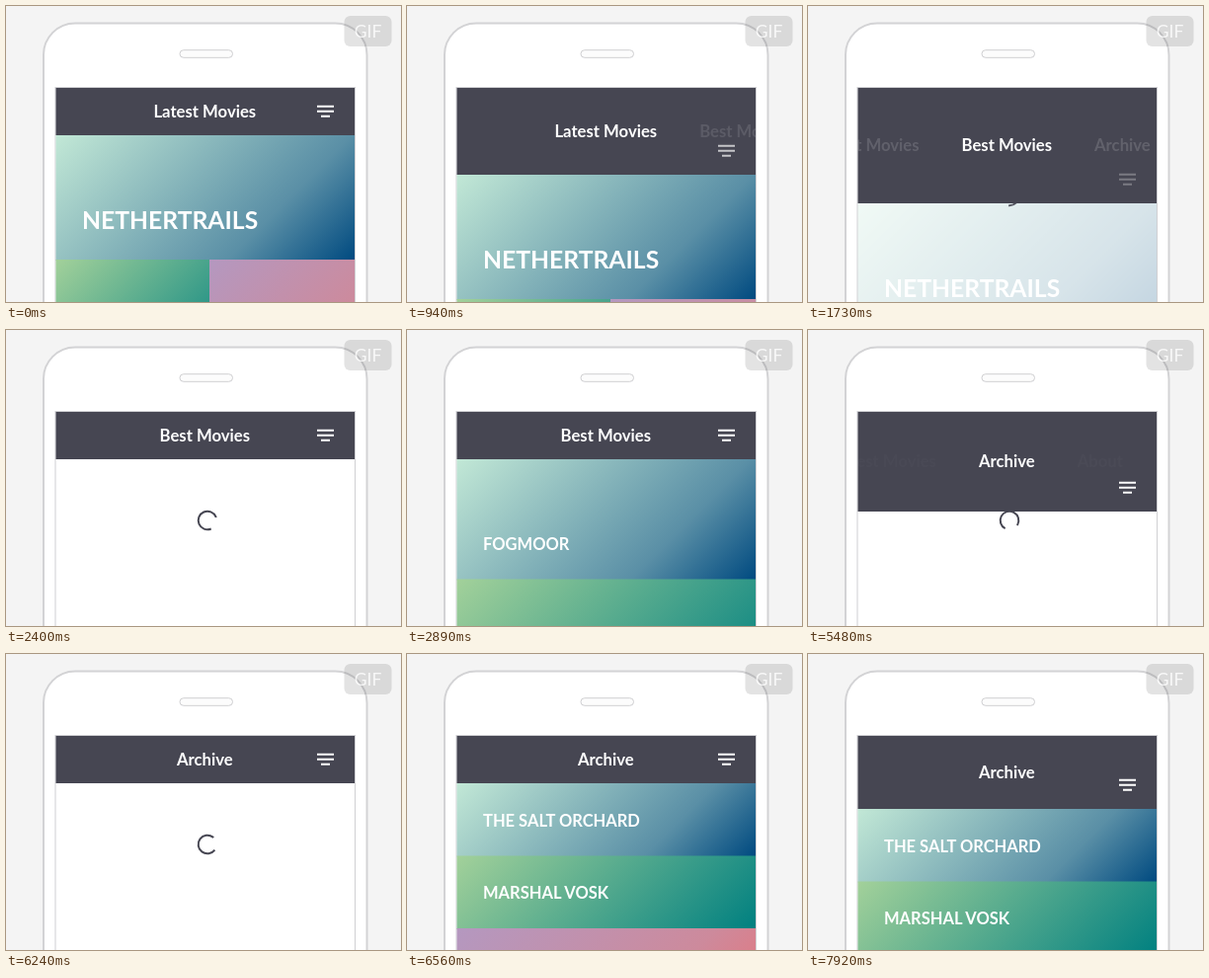
An HTML page for the animation above (8000 ms loop, 400 by 300 pixels).

```html
<!DOCTYPE html>
<html lang="en">
<head>
<meta charset="utf-8">
<title>Pull-down menu</title>
<style>
html, body { margin: 0; width: 100%; height: 100%; overflow: hidden; background: #f4f4f4; }
svg { display: block; width: 100%; height: 100%; }
text { font-family: Lato, "Open Sans", sans-serif; font-weight: 700; fill: #fff; }
</style>
</head>
<body>
<svg id="stage" viewBox="0 0 400 300">
  <defs>
    <clipPath id="screen"><rect x="50.5" y="83" width="302.5" height="217"/></clipPath>
  </defs>
  <rect width="400" height="300" fill="#f4f4f4"/>
  <rect x="38" y="17.5" width="327.5" height="340" rx="32" fill="#fff" stroke="#d3d3d5" stroke-width="2"/>
  <rect x="176" y="44.7" width="53.5" height="7.6" rx="3.8" fill="#fcfcfc" stroke="#cfcfd1"/>
  <rect x="50" y="82.5" width="303.5" height="240" fill="#fff" stroke="#d0d0d3"/>
  <g clip-path="url(#screen)">
    <g id="pages"></g>
    <circle id="spinner" cx="204" cy="193" r="9.3" fill="none" stroke="#464652" stroke-width="2" pathLength="360" stroke-dasharray="275 85"/>
    <rect id="bar" x="50" y="83" width="304" fill="#464652"/>
    <g id="titles" text-anchor="middle" font-size="16.7"></g>
    <path id="icon" d="M315 -5h17M315 0h17M319 5h9" stroke="#fff" stroke-width="2.1"/>
  </g>
  <rect x="342.5" y="10" width="48" height="31" rx="6" fill="#000" fill-opacity=".11"/>
  <text x="366.5" y="32" text-anchor="middle" font-size="17.5" fill-opacity=".8" style="font-weight:400">GIF</text>
</svg>
<script>
const LOOP = 8000, TOP = 83, REST = 131, LEFT = 50, WIDE = 303.5, CENTER = 201.3, GAP = 43;
const $ = id => document.getElementById(id);
const clamp = x => Math.min(1, Math.max(0, x));
const ramp = (t, a, b) => clamp((t - a) / (b - a));
const smooth = x => x * x * (3 - 2 * x);

function add(parent, tag, attrs, label) {
  const el = document.createElementNS("http://www.w3.org/2000/svg", tag);
  for (const k in attrs) el.setAttribute(k, attrs[k]);
  if (label) el.textContent = label;
  return parent.appendChild(el);
}

const STOPS = [0, 0.7, 1];
const MINT = ["#c2e8d6", "#5a8fa6", "#004a80"];
const GREEN = ["#a3d19a", "#319888", "#008080"];
const ROSE = ["#b498c0", "#cd8a9c", "#e5767d"];
let tileCount = 0;

// A tile filled at 45 degrees from corner to corner; the next tile covers its extra bottom pixel.
function tile(page, x, y, w, h, colors) {
  const id = "fill" + tileCount++, cx = x + w / 2, cy = y + h / 2, r = (w + h) / 4;
  const grad = add(page, "linearGradient", {
    id, gradientUnits: "userSpaceOnUse", x1: cx - r, y1: cy - r, x2: cx + r, y2: cy + r
  });
  colors.forEach((c, i) => add(grad, "stop", { offset: STOPS[i], "stop-color": c }));
  add(page, "rect", { x, y, width: w, height: h + 1, fill: `url(#${id})` });
}

const label = (page, y, size, name) => add(page, "text", { x: 77, y, "font-size": size }, name);

function makePages() {
  const [latest, best, archive] = [0, 1, 2].map(() => add($("pages"), "g", {}));
  tile(latest, LEFT, 0, WIDE, 126, MINT);
  tile(latest, LEFT, 126, 156, 126, GREEN);
  tile(latest, 206, 126, 147.5, 126, ROSE);
  label(latest, 94.5, 24.7, "NETHERTRAILS");

  tile(best, LEFT, 0, WIDE, 121.5, MINT);
  tile(best, LEFT, 121.5, WIDE, 121.5, GREEN);
  label(best, 91.7, 16.5, "FOGMOOR");

  [MINT, GREEN, ROSE].forEach((c, i) => tile(archive, LEFT, i * 73.5, WIDE, 73.5, c));
  label(archive, 43.7, 16.5, "THE SALT ORCHARD");
  label(archive, 117.2, 16.5, "MARSHAL VOSK");
  return { latest, best, archive };
}

const pages = makePages();
const titles = {}, widths = {};
for (const [key, name] of Object.entries({
  latest: "Latest Movies", best: "Best Movies", archive: "Archive", about: "About"
})) {
  titles[key] = add($("titles"), "text", {}, name);
  widths[key] = titles[key].getComputedTextLength();
}

// Each pull: drag points [time, distance], release time, swipe spans and the reload fade.
const pulls = [
  { start: 0, order: ["latest", "best", "archive", "about"], pick: 1,
    drag: [[470, 0], [500, 1], [650, 11], [790, 30], [940, 40], [1080, 52], [1230, 62], [1640, 81]],
    swipes: [[1180, 1560]], release: 1640, load: [2610, 2880] },
  { start: 3800, order: ["best", "latest", "archive", "about"], pick: 2,
    drag: [[3800, 0], [3820, 1], [3900, 6], [4050, 24], [4200, 43], [4340, 55], [4460, 64], [4610, 75], [4960, 92], [5305, 95]],
    swipes: [[4480, 4820], [4920, 5240]], release: 5305, load: [6280, 6550] },
  { start: 7600, order: ["archive", "best", "latest", "about"], pick: 0,
    drag: [[7600, 0], [7630, 1], [7750, 9], [7920, 26], [8000, 36]],
    swipes: [], release: Infinity, load: [Infinity, Infinity] }
];

function along(points, t) {
  if (t <= points[0][0]) return points[0][1];
  for (let i = 1; i < points.length; i++) {
    const [a, va] = points[i - 1], [b, vb] = points[i];
    if (t <= b) return va + (vb - va) * (t - a) / (b - a);
  }
  return points[points.length - 1][1];
}

function drawTitles(order, pos, side, y) {
  const xs = [0];
  for (let i = 1; i < order.length; i++)
    xs[i] = xs[i - 1] + (widths[order[i - 1]] + widths[order[i]]) / 2 + GAP;
  const i = Math.floor(pos), next = Math.min(i + 1, xs.length - 1);
  const shift = xs[i] + (xs[next] - xs[i]) * (pos - i);
  order.forEach((key, n) => {
    const near = clamp(1 - Math.abs(n - pos));
    titles[key].setAttribute("x", CENTER + xs[n] - shift);
    titles[key].setAttribute("y", y);
    titles[key].setAttribute("opacity", side + (1 - side) * near);
  });
}

function draw(t) {
  const pull = pulls.filter(p => t >= p.start).pop();
  const { order, release, load } = pull;
  const since = t - release, freed = since > 0;
  const back = freed ? smooth(clamp(since / 380)) : 0;
  const dist = along(pull.drag, t) * (1 - back);
  const bottom = Math.round(REST + dist);
  const open = freed ? 1 : ramp(dist, 28, 58);

  $("bar").setAttribute("height", bottom - TOP);
  $("icon").setAttribute("transform", `translate(0 ${bottom - 24.3})`);
  $("icon").setAttribute("opacity", freed ? 0.22 + 0.78 * clamp(since / 175) ** 4 : 1 - 0.78 * open);

  const pos = pull.swipes.reduce((sum, [a, b]) => sum + smooth(ramp(t, a, b)), 0);
  drawTitles(order, pos, 0.28 * open * (freed ? clamp(1 - since / 190) : 1), (TOP + bottom) / 2 + 5.5);

  const loaded = t >= load[0];
  const shown = loaded ? order[pull.pick] : order[0];
  const fade = loaded ? ramp(t, ...load) : freed ? clamp(1 - since / 120) : 1;
  for (const key in pages) {
    pages[key].setAttribute("opacity", key === shown ? fade : 0);
    pages[key].setAttribute("transform", `translate(0 ${bottom})`);
  }

  const spin = freed ? clamp(since / 100) * (1 - ramp(t, load[0] - 20, load[0] + 80)) : 0;
  $("spinner").setAttribute("opacity", spin);
  $("spinner").setAttribute("transform", `rotate(${180 + (t - 1730) / 980 * 360} 204 193)`);
}

const begin = performance.now();
function tick() {
  draw((performance.now() - begin) % LOOP);
  requestAnimationFrame(tick);
}
draw(0);
tick();
</script>
</body>
</html>
```
